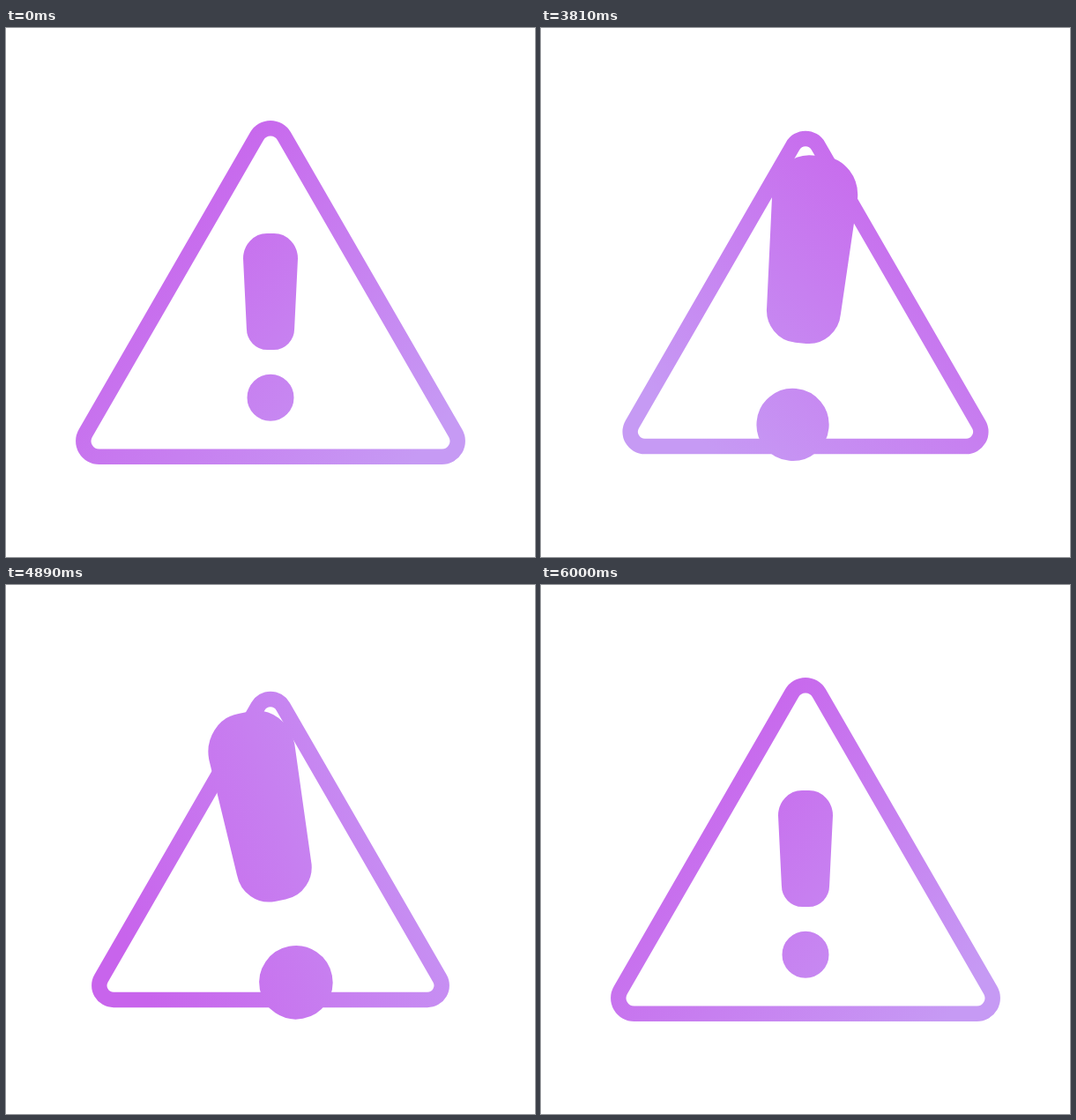
These frames come from a looping animation (600 px wide and 600 px high, 6030 ms). An HTML page without scripts:

```html
<!DOCTYPE html>
<html lang="en">
<head>
<meta charset="utf-8">
<title>Warning sign</title>
<style>
  @property --turn { syntax: "<angle>"; inherits: true; initial-value: 40deg; }
  @property --frame { syntax: "<number>"; inherits: true; initial-value: 1; }
  @property --tilt { syntax: "<angle>"; inherits: true; initial-value: 0deg; }
  @property --lift { syntax: "<length>"; inherits: true; initial-value: 0px; }
  @property --mark { syntax: "<number>"; inherits: true; initial-value: 1; }

  html, body { margin: 0; width: 100%; height: 100%; overflow: hidden; background: #fff; }

  svg {
    display: block;
    width: 600px;
    height: 600px;
    isolation: isolate;
    animation: 6.03s cubic-bezier(.33, 0, .67, 1) infinite;
    animation-name: turn, breathe, swing, leap;
  }

  .gradient { transform: rotate(var(--turn)); }
  .stencil { mix-blend-mode: screen; }

  /* Line widths are divided by the scale so that they stay constant */
  .frame {
    fill: none;
    stroke: #000;
    stroke-width: calc(17.5px / var(--frame));
    transform: scale(var(--frame));
  }
  .mark {
    stroke: #000;
    stroke-width: calc(8.8px / var(--mark));
    transform: rotate(var(--tilt)) translateY(var(--lift)) scale(var(--mark));
  }

  @keyframes turn {
    0%, 49.75% { --turn: 40deg; animation-timing-function: cubic-bezier(.33, 0, .4, 1); }
    99.5%, 100% { --turn: 400deg; }
  }
  @keyframes breathe {
    0%, 49.75%, 91.4%, 100% { --frame: 1; }
    56.7% { --frame: .86; }
    65.7% { --frame: .955; }
    76.8% { --frame: .785; }
    87% { --frame: 1.1225; }
  }
  @keyframes swing {
    0%, 49.75%, 93.2%, 100% { --tilt: 0deg; }
    56.7% { --tilt: 19.3deg; }
    73%, 76.3% { --tilt: -20deg; }
    87.9% { --tilt: 4.5deg; }
  }
  @keyframes leap {
    0%, 49.75%, 93.2%, 100% { --lift: 0px; --mark: 1; }
    56.7%, 75.1% { --lift: -92.3px; --mark: 2.39; }
    65.2% { --lift: -40px; --mark: 1.54; }
    87.6% { --lift: 1.6px; --mark: .905; }
  }
</style>
</head>
<body>
<svg viewBox="0 0 600 600">
  <defs>
    <linearGradient id="violet" gradientUnits="userSpaceOnUse" x1="-210" x2="210" y1="0" y2="0">
      <stop stop-color="#c864ec"/>
      <stop offset="1" stop-color="#c69af4"/>
    </linearGradient>
  </defs>

  <!-- Turning gradient, seen only through the black parts of the stencil -->
  <g transform="translate(330 322)">
    <rect class="gradient" x="-500" y="-500" width="1000" height="1000" fill="url(#violet)"/>
  </g>

  <g class="stencil">
    <rect width="600" height="600" fill="#fff"/>
    <g transform="translate(300 300)">
      <path class="frame" d="M-15.4-177.4a17.75 17.75 0 0 1 30.8 0l194.4 337a17.75 17.75 0 0 1-15.4 26.65h-388.8a17.75 17.75 0 0 1-15.4-26.65z"/>
      <g class="mark">
        <path d="M-26.6-38.5a22.6 24.1 0 0 1 22.6-24.1h8a22.6 24.1 0 0 1 22.6 24.1l-3.9 79.5a19 19.6 0 0 1-19 19.6h-7.4a19 19.6 0 0 1-19-19.6z"/>
        <circle cy="119.3" r="22.1"/>
      </g>
    </g>
  </g>
</svg>
</body>
</html>
```
